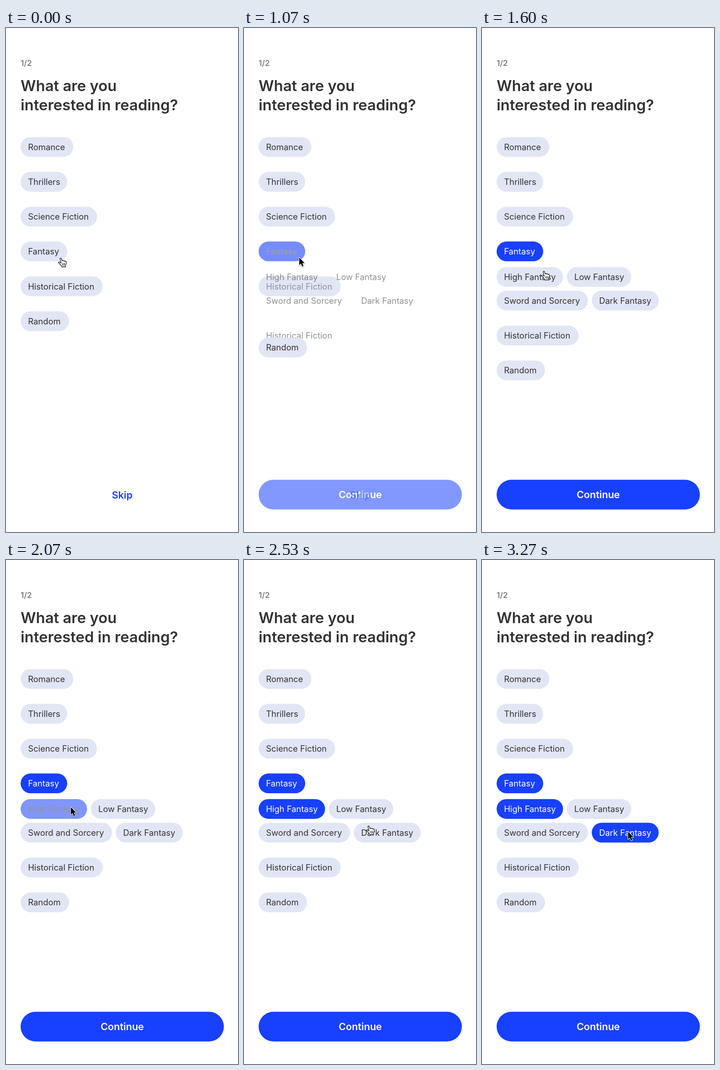
These frames come from a looping animation (508x1102 px, 4.27 s). An HTML page:

```html
<!DOCTYPE html>
<html lang="en">
<head>
<meta charset="utf-8">
<title>Reading interests</title>
<style>
  html, body { margin: 0; height: 100%; overflow: hidden; background: #fff; }
  svg { display: block; width: 100vw; height: 100vh; font-family: Inter, Roboto, sans-serif; }
  .chip { font-size: 18.4px; }
  .title { font-size: 32.9px; font-weight: 600; fill: #333; }
  .step { font-size: 17.3px; font-weight: 600; fill: #7d7d7d; }
  .action { font-size: 21.6px; font-weight: 600; text-anchor: middle; }
</style>
</head>
<body>
<svg id="stage" viewBox="0 0 508 1102"></svg>
<script>
const LOOP = 4270, TICK = 200 / 3;
const PALE = [225, 230, 245], BLUE = [24, 64, 255], INK = [51, 51, 51], WHITE = [255, 255, 255];
const stage = document.getElementById('stage');

const lerp = (a, b, p) => a + (b - a) * p;
const mix = (a, b, p) => `rgb(${a.map((v, i) => Math.round(lerp(v, b[i], p)))})`;
const easeOut = (t, start, length, power = 2) =>
  1 - (1 - Math.min(1, Math.max(0, (t - start) / length))) ** power;

// on: how far the chip is selected; box and ink: opacity of its pill and label
function chip(label, x, y, w, { on = 0, box = 1, ink = 1 } = {}) {
  return `<rect x="${x}" y="${y}" width="${w}" height="43.3" rx="21.65" fill="${mix(PALE, BLUE, on)}" opacity="${box}"/>
    <text class="chip" x="${x + 16.2}" y="${y + 28.4}" fill="${mix(INK, WHITE, on)}" opacity="${ink}">${label}</text>`;
}

const hand = (x, y) => `<g transform="translate(${x} ${y})" stroke="#111" stroke-width="1.3" stroke-linejoin="round" stroke-linecap="round">
  <path fill="#fff" d="M4.3 2.2C3.8 .3 6.8-.4 7.4 1.5L9 6.2C9.6 5 11.8 5 12.2 6.6 13 5.6 15 5.8 15.4 7.4 16.4 6.6 18.3 7.2 18.2 9 18.2 12 18 13.5 16.4 16V19.5H14.5L13 18.3 11.5 19.5H8.6C8 17 5 15 3.8 12.8 2.6 11.4 1.2 10.9 .8 10 1 8.2 3.4 8.4 5 10L6.6 11Z"/>
  <path fill="none" stroke-width="1" d="M9.6 11.5V16M12 11.5V16M14.4 11.5V16"/></g>`;

const arrow = (x, y) => `<path transform="translate(${x + 7} ${y - 1})" stroke="#fff" stroke-width="2" stroke-linejoin="round"
  paint-order="stroke" style="filter:drop-shadow(0 1px 1px #0006)"
  d="M0 0V16.4L3.7 12.9 6.6 19.5 9.3 18.3 6.5 11.9H11.5Z"/>`;

function cursor(t) {
  const a = easeOut(t, 1437, 330), b = easeOut(t, 2366, 460, 3);
  const x = lerp(lerp(114, 135, a), 313, b), y = lerp(lerp(503, 541.5, a), 595, b);
  const pressed = [[1000, 1437], [2060, 2366], [3060, LOOP]].some(([from, to]) => t >= from && t < to);
  return (pressed ? arrow : hand)(x, y);
}

function draw(t) {
  const open = t < 1000 ? 0 : easeOut(t, 967, 313);
  const pills = open ** 9;
  const high = t < 2060 ? 0 : easeOut(t, 1979, 313);
  const dark = t < 3060 ? 0 : easeOut(t, 2960, 313);
  const fresh = { box: pills, ink: open };

  stage.innerHTML = `
    <text class="step" x="32" y="83">1/2</text>
    <text class="title" x="32" y="138">What are you</text>
    <text class="title" x="32" y="180">interested in reading?</text>` +
    chip('Romance', 32, 238.4, 115.5) +
    chip('Thrillers', 32, 314.6, 102) +
    chip('Science Fiction', 32, 390.8, 167.3) +
    chip('Fantasy', 32, 466.8, 102, { on: open }) +
    chip('Historical Fiction', 32, 543.2, 179.5, { box: 1 - pills, ink: 1 - open }) +
    chip('High Fantasy', 32, 522.7, 145.5, { ...fresh, on: high }) +
    chip('Low Fantasy', 185.8, 522.7, 141, fresh) +
    chip('Sword and Sorcery', 32, 574.4, 200, fresh) +
    chip('Dark Fantasy', 240.3, 574.4, 146.6, { ...fresh, on: dark }) +
    chip('Historical Fiction', 32, 650.7, 179.5, fresh) +
    chip('Random', 32, lerp(619.4, 726.9, open), 106) +
    `<g opacity="${open}">
      <rect x="32" y="987.8" width="445" height="65" rx="32.5" fill="rgb(${BLUE})"/>
      <text class="action" x="254.5" y="1027.5" fill="#fff">Continue</text>
    </g>
    <text class="action" x="254.5" y="1028.7" fill="#1a41ea" opacity="${1 - open}">Skip</text>` +
    cursor(t);
}

// The screen refreshes 15 times a second
let last = null;
function frame(now) {
  const tick = Math.max(-1, Math.floor((now % LOOP - 995) / TICK));
  if (tick !== last) {
    last = tick;
    draw(tick < 0 ? 0 : 1000 + tick * TICK);
  }
  requestAnimationFrame(frame);
}
frame(0);
</script>
</body>
</html>
```
